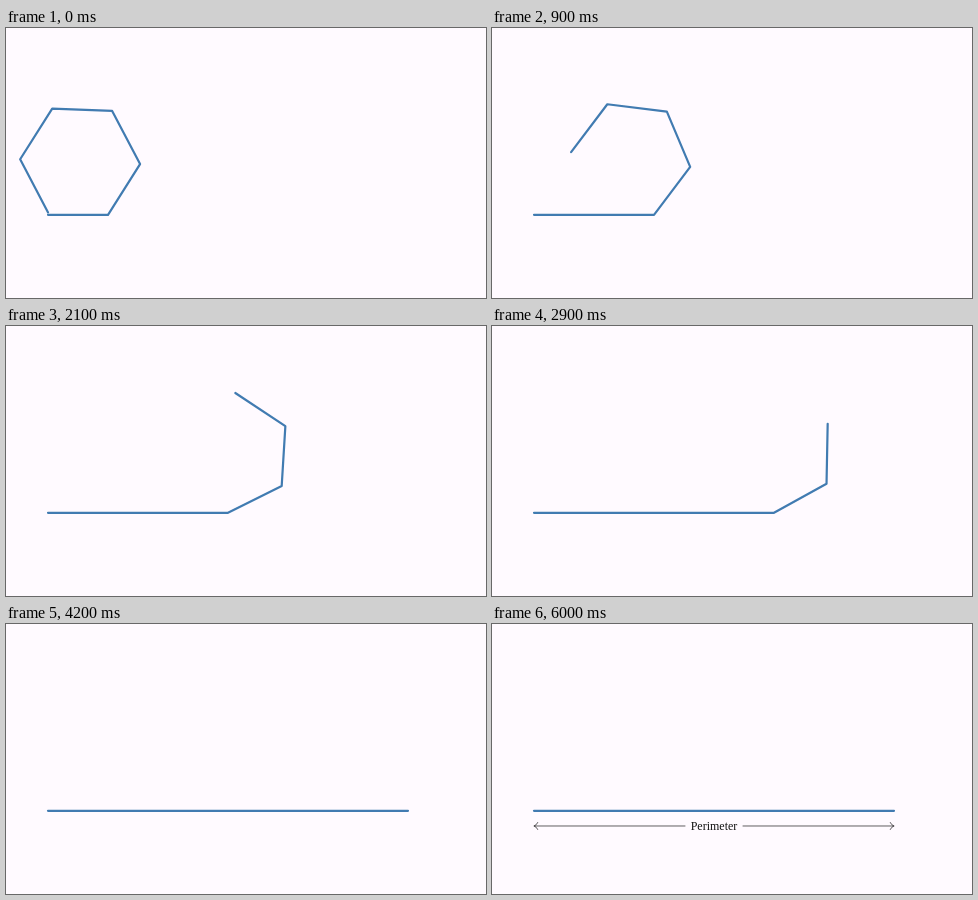
These frames come from a looping animation (480 px wide and 270 px high, 8 s). An HTML page:

```html
<!DOCTYPE html>
<html lang="en">
<head>
<meta charset="utf-8">
<title>Perimeter of a hexagon</title>
<style>
  html, body { margin: 0; width: 100%; height: 100%; overflow: hidden; background: #fffaff; }
  svg { display: block; width: 100%; height: 100%; }
  #sides { fill: none; stroke: #417bb1; stroke-width: 2.2; stroke-linecap: round; stroke-linejoin: round; }
  .arrow { fill: none; stroke: #1c1a1c; stroke-width: .7; stroke-linecap: round; }
  text { font: 12px "Liberation Serif", "Noto Serif", serif; text-anchor: middle; fill: #111; }
</style>
</head>
<body>
<svg viewBox="0 0 480 270">
  <g id="label">
    <path class="arrow" d="M-29 15.2H-180M-176.3 11.7Q-177.4 14.2 -180 15.2Q-177.4 16.2 -176.3 18.7"/>
    <path class="arrow" d="M29 15.2H180M176.3 11.7Q177.4 14.2 180 15.2Q177.4 16.2 176.3 18.7"/>
    <text y="19">Perimeter</text>
  </g>
  <polyline id="sides"/>
</svg>
<script>
const LOOP = 8000, STEP = 100;
const START = { x: 42, y: 186.8 }, SIDE = 60, COUNT = 6, TURN = 360 / COUNT;
const ROLL = { speed: 0.072, lead: 2.3 };      // degrees per ms, degrees at time zero
const GROW = { start: 4950, length: 1070 };

const sides = document.getElementById("sides");
const label = document.getElementById("label");

// Sides up to the pivot lie flat; the rest turn together around it.
function unrolled(angle) {
  const flat = Math.floor(angle / TURN);
  const turned = angle % TURN;
  let { x, y } = START;
  const points = [[x, y]];
  for (let i = 0; i < COUNT; i++) {
    const heading = i <= flat ? 0 : ((i - flat) * TURN - turned) * Math.PI / 180;
    x += SIDE * Math.cos(heading);
    y -= SIDE * Math.sin(heading);
    points.push([x.toFixed(2), y.toFixed(2)]);
  }
  return points.join(" ");
}

function draw(t) {
  const angle = Math.min(ROLL.lead + ROLL.speed * t, (COUNT - 1) * TURN);
  sides.setAttribute("points", unrolled(angle));

  const p = Math.min(Math.max((t - GROW.start) / GROW.length, 0), 1);
  const scale = 1 - (1 - p) ** 2;
  const middle = START.x + SIDE * COUNT / 2;
  label.style.display = p > 0 ? "" : "none";
  label.setAttribute("transform", `translate(${middle} ${START.y}) scale(${scale})`);
}

const begin = performance.now();
function tick() {
  const t = (performance.now() - begin) % LOOP;
  draw(Math.floor(t / STEP) * STEP);
  requestAnimationFrame(tick);
}
tick();
</script>
</body>
</html>
```
